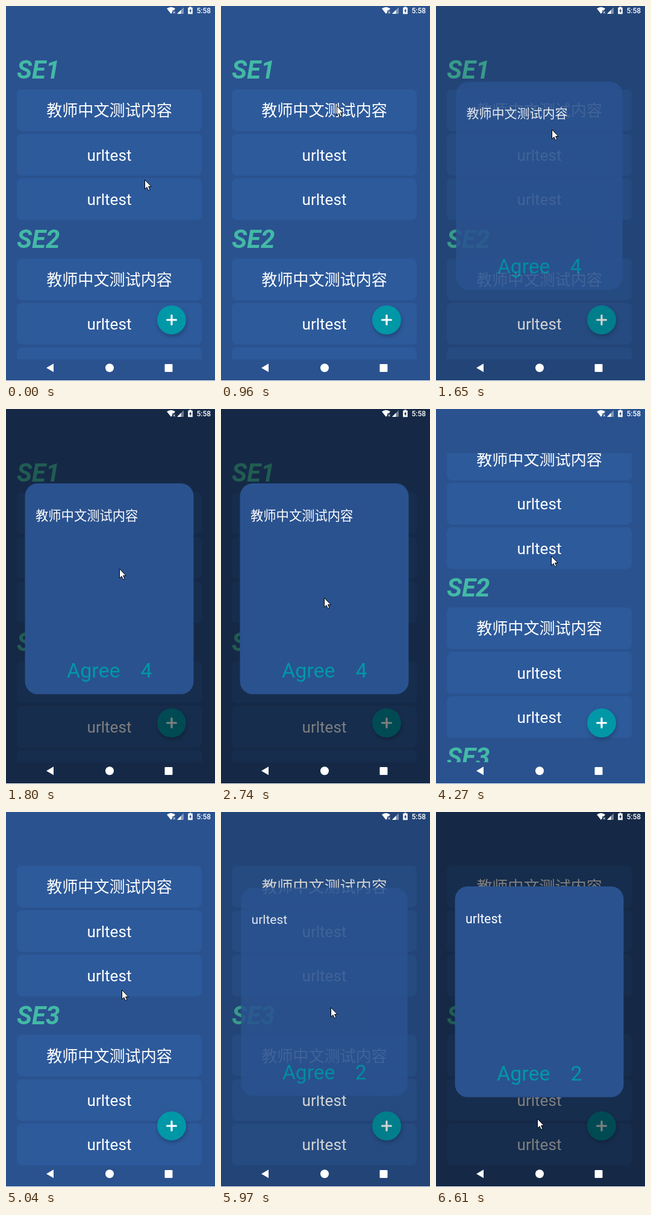
Write an HTML page that moves like this. It is 347 px wide and 620 px high and loops after 6680 ms.

```html
<!DOCTYPE html>
<html lang="zh-CN">
<head>
<meta charset="utf-8">
<title>Course list</title>
<style>
  html, body { margin: 0; width: 100%; height: 100%; overflow: hidden; background: #2a528f; }
  svg { display: block; width: 347px; height: 620px; }
  text { font-family: Roboto, "Noto Sans CJK SC", "Noto Sans CJK", sans-serif; fill: #fff; }
  .head { font-size: 42px; font-weight: 700; font-style: italic; fill: #43b9a6; }
  .row { font-size: 26.1px; text-anchor: middle; }
  .title { font-size: 21.3px; }
  .agree { font-size: 34px; fill: #0097a7; }
  .clock { font-size: 12px; font-weight: 500; }
  .fab { filter: drop-shadow(1px 3px 3px rgba(0, 0, 0, .25)); }
</style>
</head>
<body>
<svg viewBox="0 0 347 620">
  <defs><clipPath id="view"><rect x="0" y="73" width="347" height="511"/></clipPath></defs>
  <rect width="347" height="620" fill="#2a528f"/>
  <g clip-path="url(#view)"><g id="list"></g></g>

  <g class="fab">
    <circle cx="275" cy="519" r="24" fill="#0097a7"/>
    <path d="M267.5 519h15M275 511.5v15" stroke="#fff" stroke-width="3.2" stroke-linecap="round"/>
  </g>
  <rect id="dim" width="347" height="620"/>

  <g id="dialog">
    <rect x="31.5" y="123" width="280" height="348.5" rx="21" fill="#2a528f"/>
    <text id="title" class="title" x="49" y="184"></text>
    <text class="agree" x="101" y="443.5">Agree</text>
    <text id="count" class="agree" x="223.5" y="443.5"></text>
  </g>

  <g fill="#fff">
    <path d="M267 4.3Q274 -.7 281 4.3L278.7 7.2H276.2V10.3L274 13Z"/>
    <path d="M277.6 9l3.2 3.2M280.8 9l-3.2 3.2" stroke="#fff"/>
    <path d="M284 13H295V2Z" opacity=".4"/>
    <path d="M284 13H290.5V6.5Z"/>
    <path fill-rule="evenodd" d="M304.5 1.2h3v1.3h2.3v10.8h-7.6V2.5h2.3ZM306.8 4L304 8.5h1.6V12L308.2 7.3H306.8Z"/>
    <text class="clock" x="316.5" y="11.5">5:58</text>
    <path d="M67 598.3L79 591.3V605.3Z"/>
    <circle cx="172" cy="598.3" r="7"/>
    <rect x="263.5" y="592" width="13" height="13" rx="1"/>
    <rect y="619" width="347" height="1"/>
  </g>

  <g id="pointer">
    <circle id="press" cx="8" cy="9" r="29.5" fill="#f4f400" fill-opacity=".48"/>
    <path d="M.5 .3V15.8L4 12.5L6.4 17.8L8.9 16.7L6.6 11.5H11.2Z" fill="#fff" stroke="#000"/>
  </g>
</svg>
<script>
const LOOP = 6680;
const STEP = 77;
const SCROLL_END = 328.5;
const $ = id => document.getElementById(id);

// Each leg takes the pointer to a new spot in n steps.
const home = { x: 230, y: 287 };
const legs = [
  { at: 410, n: 8, x: 192, y: 165 },
  { at: 1650, n: 7, x: 171, y: 312 },
  { at: 2817, n: 6, x: 151, y: 495 },
  { at: 4120, n: 3, x: 191, y: 243 },
  { at: 4810, n: 4, x: 192, y: 294 },
  { at: 5117, n: 3, x: 182, y: 274 },
  { at: 5970, n: 9, x: 168, y: 507 }
];
const presses = [[1110, 1340], [2260, 2740], [3430, 3890], [5510, 5750]];

function buildList() {
  let html = "";
  for (let s = 0; s < 3; s++) {
    const top = 138 + s * 279.4;
    html += `<text class="head" x="18" y="${top - 17.6}">SE${s + 1}</text>`;
    ["教师中文测试内容", "urltest", "urltest"].forEach((label, i) => {
      const y = top + i * 73.4;
      html += `<rect x="18" y="${y}" width="307" height="69" rx="8" fill="#2d5a9b"/>
        <text class="row" x="171.5" y="${y + 44.2}">${label}</text>`;
    });
  }
  $("list").innerHTML = html;
}

// Progress from 0 to 1 in n held steps; the first lands at the given time.
function steps(t, at, n) {
  const k = Math.floor((t - at + 5) / STEP) + 1;
  return Math.max(0, Math.min(1, k / n));
}

// x eases in and y eases out, which bends the path.
function pointerAt(t) {
  let { x, y } = home;
  for (const leg of legs) {
    const p = steps(t, leg.at, leg.n);
    x += (leg.x - x) * p * p;
    y += (leg.y - y) * (1 - (1 - p) ** 2);
  }
  return [Math.round(x), Math.round(y)];
}

function dialogAt(t, second) {
  const shut = second ? 0 : steps(t, 3570, 3);
  const shown = steps(t, second ? 5970 : 1650, 3) - shut;
  const alpha = shut ? shown ** 4 : 1 - (1 - shown) ** 5;
  return { dim: shown / 2, alpha, scale: .9 + alpha / 10 };
}

function draw(t) {
  const second = t > 5000;
  const [x, y] = pointerAt(t);
  const { dim, alpha, scale } = dialogAt(t, second);
  const scroll = SCROLL_END * steps(t, 4120, 9) ** 1.185;
  const down = presses.some(([on, off]) => t >= on && t < off);

  $("list").setAttribute("transform", `translate(0 ${-scroll})`);
  $("dim").setAttribute("opacity", dim);
  $("dialog").setAttribute("opacity", alpha);
  $("dialog").setAttribute("transform",
    `translate(171.5 297.25) scale(${scale}) translate(-171.5 -297.25)`);
  $("title").textContent = second ? "urltest" : "教师中文测试内容";
  $("count").textContent = second ? "2" : "4";
  $("pointer").setAttribute("transform", `translate(${x} ${y})`);
  $("press").setAttribute("visibility", down ? "visible" : "hidden");
}

buildList();
const start = performance.now();
function tick() {
  draw((performance.now() - start) % LOOP);
  requestAnimationFrame(tick);
}
tick();
</script>
</body>
</html>
```
